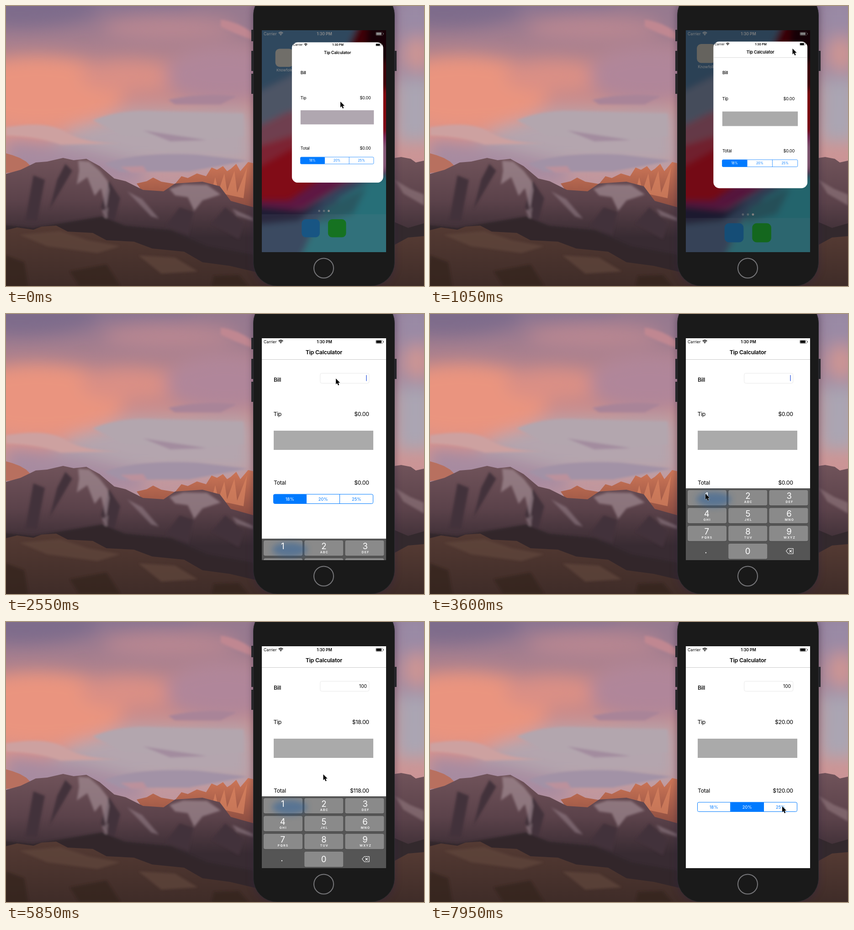
Write an HTML page that moves like this. It is 915 px wide and 612 px high and loops after 8000 ms.

```html
<!DOCTYPE html>
<html lang="en">
<head>
<meta charset="utf-8">
<title>Tip Calculator</title>
<style>
html, body { margin: 0; width: 100%; height: 100%; overflow: hidden; background: #1a1a1a; }
svg { display: block; width: 915px; height: 612px; }
text { font-family: Inter, "Open Sans", sans-serif; }
.label { font-size: 12.3px; letter-spacing: -.3px; }
.mid { text-anchor: middle; }
.end { text-anchor: end; }
.small { font-size: 8.7px; }
.name { font-size: 8.7px; fill: #fff; text-anchor: middle; }
.digit { font-size: 18.5px; fill: #fff; text-anchor: middle; }
.letters { font-size: 6.7px; font-weight: 600; letter-spacing: 1.4px; fill: #fff; text-anchor: middle; }
.rate { font-size: 9.4px; text-anchor: middle; }
</style>
</head>
<body>
<svg viewBox="0 0 915 612">
  <defs>
    <linearGradient id="sky" x2="0" y2="1">
      <stop offset="0" stop-color="#8c7591"/>
      <stop offset=".2" stop-color="#b5848c"/>
      <stop offset=".45" stop-color="#d8928c"/>
      <stop offset=".72" stop-color="#b498a6"/>
      <stop offset="1" stop-color="#9a869d"/>
    </linearGradient>
    <linearGradient id="slope" x2="0" y2="1">
      <stop offset="0" stop-color="#70535a"/>
      <stop offset=".35" stop-color="#5b424a"/>
      <stop offset=".65" stop-color="#382b32"/>
    </linearGradient>
    <linearGradient id="crag" x2="0" y2="1">
      <stop offset="0" stop-color="#cf7757"/>
      <stop offset="1" stop-color="#85493f"/>
    </linearGradient>
    <linearGradient id="rocks" x2="0" y2="1">
      <stop offset="0" stop-color="#543a33"/>
      <stop offset="1" stop-color="#3f2c28"/>
    </linearGradient>
    <filter id="soft" x="-50%" y="-50%" width="200%" height="200%"><feGaussianBlur stdDeviation="18"/></filter>
    <filter id="mist" x="-50%" y="-50%" width="200%" height="200%"><feGaussianBlur stdDeviation="7"/></filter>
    <filter id="haze" x="-50%" y="-50%" width="200%" height="200%"><feGaussianBlur stdDeviation="2.5"/></filter>
    <clipPath id="screen"><rect x="560" y="53" width="272" height="485"/></clipPath>
    <clipPath id="frame"><rect id="frameBox"/></clipPath>
  </defs>

  <!-- scenery -->
  <rect width="915" height="612" fill="url(#sky)"/>
  <g filter="url(#soft)">
    <ellipse cx="30" cy="0" rx="170" ry="45" fill="#7e6c8b"/>
    <ellipse cx="520" cy="10" rx="120" ry="40" fill="#96798f"/>
    <ellipse cx="360" cy="50" rx="150" ry="28" fill="#b88691"/>
    <ellipse cx="70" cy="190" rx="190" ry="80" fill="#ea947f"/>
    <ellipse cx="270" cy="155" rx="110" ry="35" fill="#da8f85"/>
    <ellipse cx="480" cy="150" rx="130" ry="60" fill="#b0869a"/>
    <path d="M150 265L270 228L541 225V350H330L90 305Z" fill="#b4a5ae"/>
    <path d="M0 290L160 310L300 345V390H0Z" fill="#a78ba0"/>
    <path d="M851 -20H940V160H851Z" fill="#9a8aa5"/>
    <ellipse cx="900" cy="105" rx="30" ry="40" fill="#cf9592"/>
    <path d="M851 160H940V300H851Z" fill="#aaa5b2"/>
  </g>
  <g filter="url(#haze)">
    <path d="M0 265Q90 250 130 275T250 300L120 303Q70 285 0 283Z" fill="#cda1a0"/>
    <path d="M190 250Q250 225 330 230L520 235V285L440 292L260 285Z" fill="#b3a6ae"/>
    <path d="M355 205Q430 188 505 197L470 215H370Z" fill="#a98498"/>
    <path d="M300 272L440 293L360 296Z" fill="#a38c9f"/>
    <path d="M470 30Q510 35 541 60V75Q500 60 470 45Z" fill="#c08791"/>
    <path d="M215 345Q290 318 420 325L530 338L400 362H250Z" fill="#a292a6"/>
    <path d="M250 352L300 350L310 364H275Z" fill="#bb919c"/>
  </g>
  <path d="M0 322L14 326L30 332L44 340L54 350L30 362L0 365Z" fill="#b8705f"/>
  <path d="M286 388L308 383L322 375L340 384L370 389L384 372L398 376L418 366L438 372L450 353L462 358L475 350L484 361L492 356L504 345L513 361L530 341L560 348V450H330Z" fill="url(#crag)"/>
  <path d="M450 405L458 374L465 405L478 366L484 405L500 360L506 408L528 352L520 420Z" fill="#d98460" opacity=".7"/>
  <path d="M0 367L32 358L65 342L90 340L125 332L148 337L176 334L205 350L237 377L262 383L300 402L345 405L370 388L430 384L468 394L492 426L560 445V600H0Z" fill="url(#slope)"/>
  <g filter="url(#haze)">
    <path d="M60 370L85 380L68 470H42ZM130 345L145 360L95 445L112 380ZM225 382L250 420L235 480L208 440ZM380 440L410 450L400 500L350 480ZM480 440L520 475L510 510L450 475Z" fill="#43333b"/>
    <path d="M158 338L182 340L205 360L222 382L226 402L219 445L208 398L194 415L178 374L155 390L160 360ZM358 400L388 390L440 391L470 412L430 425L412 448L398 418L370 414Z" fill="#aa959d" opacity=".6"/>
    <path d="M265 405L298 422L335 465L318 460ZM495 443L541 463V470L505 458ZM210 448L224 440L220 470Z" fill="#a59099" opacity=".45"/>
    <path d="M-10 478L60 485L120 475L210 460L260 480L360 490L440 525L580 550V612H-10Z" fill="#30262a"/>
  </g>
  <path d="M0 490L24 484L60 489L78 482L110 480L135 493L190 496L220 512L280 515L320 530L390 537L430 560L490 568L541 580L600 590V612H0Z" fill="url(#rocks)"/>
  <g filter="url(#haze)">
    <path d="M0 545L40 560L50 620H-10ZM140 580L220 565L250 612H160ZM455 590L510 588L530 612H450Z" fill="#33241f" opacity=".7"/>
    <path d="M30 500L120 492L180 512L250 525L200 540L90 525ZM290 545L370 550L420 580L340 585Z" fill="#62463c" opacity=".7"/>
  </g>
  <path d="M800 333H845L865 330L886 334L897 342L915 338V612H800Z" fill="url(#slope)"/>
  <path d="M851 380L885 400L915 412V436L870 410Z" fill="#8b7278" opacity=".7" filter="url(#haze)"/>
  <path d="M800 470H845L880 485L915 475V612H800Z" fill="#33292d"/>
  <path d="M800 540L845 525L880 506L915 503V612H800Z" fill="url(#rocks)"/>

  <!-- phone -->
  <rect x="538" y="-32" width="316" height="648" rx="52" fill="#30203c" opacity=".35" filter="url(#mist)"/>
  <path d="M537 52h6v25h-6zM537 98h6v44h-6zM537 148h6v44h-6zM849 98h6v44h-6z" fill="#26252a"/>
  <rect x="541.5" y="-32" width="309" height="644" rx="52" fill="#1a1a1a" stroke="#2c2b30"/>
  <circle cx="695.5" cy="573" r="21.5" fill="#191919" stroke="#77777a" stroke-width="2"/>

  <g clip-path="url(#screen)">
    <g id="home">
      <rect x="560" y="53" width="272" height="485" fill="#ea152a"/>
      <g filter="url(#mist)">
        <path d="M540 30H800L725 130L735 235L680 250L540 320Z" fill="#5683ab"/>
        <path d="M540 195L640 145L700 155L725 200L705 235L540 290Z" fill="#8c9ab8"/>
        <path d="M540 270L610 235L725 200L735 235L670 275L540 330Z" fill="#c9738f"/>
        <path d="M540 310L620 285L690 265L650 300L540 360Z" fill="#e2405b"/>
        <path d="M680 120L725 130L758 165L735 235L725 205Z" fill="#76486a"/>
        <path d="M775 30H850V175L745 215L728 135Z" fill="#750611"/>
        <path d="M790 30H850V120L785 130Z" fill="#2c0409"/>
        <path d="M850 175L740 225L715 270L850 245Z" fill="#f0101d"/>
        <path d="M540 425L620 425L700 370L760 310L805 275L850 280V400L690 450L540 470Z" fill="#ab2a79"/>
        <path d="M720 355L765 300L805 275L850 285V350L770 362Z" fill="#e457ad"/>
        <ellipse cx="825" cy="330" rx="20" ry="32" fill="#f5a6da"/>
        <path d="M540 445L650 445L730 395L790 368L850 360V560H540Z" fill="#5b78a5"/>
        <path d="M540 435L650 448L700 425L640 470L540 480Z" fill="#38305f"/>
        <path d="M680 475L730 420L790 385L850 368V560H640Z" fill="#46c9da"/>
        <path d="M700 440L790 395L760 455L690 475Z" fill="#4b9fb1"/>
      </g>
      <path d="M680 270L678 245L700 240L712 248L719 260L700 258Z" fill="#b92d55" opacity=".6" filter="url(#haze)"/>
      <g id="icons">
        <rect x="400" y="471" width="600" height="250" fill="#d8ecff" opacity=".12"/>
        <g fill="#fff">
          <circle cx="684.5" cy="463" r="2.6" opacity=".5"/>
          <circle cx="696" cy="463" r="2.6" opacity=".5"/>
          <circle cx="707.5" cy="463" r="2.6"/>
        </g>
        <g id="tiles"></g>
        <g id="launcher">
          <rect x="769" y="73.500" width="43.500" height="43.500" rx="10" fill="#fafafa"/>
          <path id="grid" fill="none" stroke="#c9c9c9" stroke-width=".6"/>
          <rect id="press" x="769" y="73.500" width="43.500" height="43.500" rx="10" opacity=".4"/>
        </g>
      </g>
      <g id="homeBar"></g>
      <rect id="dim" x="560" y="53" width="272" height="485"/>
    </g>

    <g id="window" clip-path="url(#frame)">
      <g id="app">
        <rect x="560" y="53" width="272" height="485" fill="#fff"/>
        <g id="appBar"></g>
        <text class="mid" x="695.8" y="88" font-size="12.3" font-weight="600" letter-spacing="-.2">Tip Calculator</text>
        <path id="rule" d="M560 99.500H832" stroke="#cacaca"/>
        <text class="label" x="586" y="147.800" font-weight="500">Bill</text>
        <g id="field">
          <rect x="687.800" y="129.500" width="107" height="21.800" rx="3.500" fill="#fff" stroke="#e9e9e9"/>
          <text id="bill" class="end" x="790" y="143.800" font-size="10.2"></text>
          <path id="caret" d="M789 133.500V146.500" stroke="#4a6ee0" stroke-width="1.5"/>
        </g>
        <text class="label" x="585.500" y="223">Tip</text>
        <text id="tip" class="label end" x="794.800" y="223"></text>
        <rect id="bar" x="586" y="255" width="218" height="42"/>
        <text class="label" x="586" y="372.700">Total</text>
        <text id="total" class="label end" x="794.800" y="372.700"></text>
        <g id="rates"></g>
        <rect x="585.500" y="394" width="218" height="20.500" rx="3" fill="none" stroke="#007aff"/>
        <path d="M657.500 394V414.500M730.500 394V414.500" stroke="#007aff"/>
      </g>
      <rect id="cover" fill="#fafafa"/>
    </g>
    <g id="keyboard"></g>
  </g>
  <path id="pointer" d="M0 0V12.800L2.900 10.100L5 15L7.200 14L5.200 9.200H9.200Z" stroke="#fff" stroke-width=".8" paint-order="stroke"/>
</svg>
<script>
const TICK = 150, LOOP = 8000;
const $ = id => document.getElementById(id);
const set = (id, attrs) => { for (const k in attrs) $(id).setAttribute(k, attrs[k]); };
const show = (id, on) => set(id, { visibility: on ? 'visible' : 'hidden' });

// Linear interpolation through rows of [time, ...values].
function track(rows, t) {
  let i = 0;
  while (i < rows.length - 1 && rows[i + 1][0] <= t) i++;
  const a = rows[i], b = rows[i + 1] || a;
  const k = b === a ? 0 : Math.max(0, (t - a[0]) / (b[0] - a[0]));
  return a.slice(1).map((v, j) => v + (b[j + 1] - v) * k);
}

function statusBar(color) {
  return `<g fill="${color}"><text class="small" x="564" y="64">Carrier</text>
    <text class="small mid" x="697" y="64" font-weight="600">1:30 PM</text>
    <path d="M599.600 62.300Q601.500 60.600 603.400 62.300L601.500 64.300Z"/>
    <g fill="none" stroke="${color}" stroke-width="1.4">
      <path d="M598.300 61Q601.500 58 604.700 61M596.600 59.200Q601.500 55 606.400 59.200"/></g>
    <rect x="809.500" y="57" width="15.500" height="7.500" rx="1.800" fill="none" stroke="${color}" stroke-width=".6" opacity=".7"/>
    <rect x="810.500" y="58" width="11.500" height="5.500" rx=".8"/>
    <path d="M826.200 59.500v2.500" stroke="${color}" stroke-width="1"/></g>`;
}

function buildHome() {
  const tile = (x, y, fill) =>
    `<rect x="${x - 21.75}" y="${y - 21.75}" width="43.5" height="43.5" rx="10" fill="${fill}"/>`;
  const names = ['Knowfolk', 'Sheaf', 'Dials', 'plimp'];
  const fills = ['#cbc7be', '#fbfcfd', '#1b1b1d'];
  $('tiles').innerHTML =
    names.map((n, i) => `<text class="name" x="${600.7 + i * 63.3}" y="128.5">${n}</text>`).join('') +
    fills.map((f, i) => tile(600.9 + i * 63.2, 95.2, f)).join('') +
    tile(664.2, 504.7, '#2b9bed') + tile(727.5, 504.7, '#28cf3c');
  let d = 'M769 73.5l43.5 43.5M812.5 73.5l-43.5 43.5';
  for (let i = 1; i < 6; i++) {
    const s = i * 7.25;
    d += `M${769 + s} 73.5v43.5M769 ${73.5 + s}h43.5`;
  }
  for (const r of [8, 12, 18]) d += `M${790.75 - r} 95.25a${r} ${r} 0 1 0 ${2 * r} 0a${r} ${r} 0 1 0 ${-2 * r} 0`;
  set('grid', { d });
}

function buildKeyboard() {
  const letters = ['', 'ABC', 'DEF', 'GHI', 'JKL', 'MNO', 'PQRS', 'TUV', 'WXYZ'];
  const keyBox = (n, x, y) =>
    `<rect x="${x}" y="${y + 1}" width="85" height="33.500" rx="3.5" fill="#414141"/>
     <rect id="key${n}" x="${x}" y="${y}" width="85" height="33.500" rx="3.5"/>`;
  let boxes = '', text = '';
  letters.forEach((s, i) => {
    const x = 564 + (i % 3) * 89.2, y = 385 + Math.floor(i / 3) * 39;
    const cx = 605.7 + (i % 3) * 90.2;
    boxes += keyBox(i + 1, x, y);
    text += `<text class="digit" x="${cx}" y="${y + 18.5}">${i + 1}</text>
      <text class="letters" x="${cx + 1}" y="${y + 28}">${s}</text>`;
  });
  $('keyboard').innerHTML = `<rect x="560" y="381" width="272" height="157" fill="#555"/>
    ${boxes}${keyBox(0, 653.2, 502)}
    <ellipse cx="621" cy="405" rx="38" ry="16" fill="#285f9c" opacity=".5" filter="url(#mist)"/>
    ${text}<text class="digit" x="695.700" y="525">0</text>
    <text class="digit" x="604" y="523" font-size="16">.</text>
    <path d="M779.500 518l5-5.500h10.500v11.500h-10.500zM786.500 515.500l5.500 5.500m0-5.500l-5.500 5.500"
      fill="none" stroke="#fff" stroke-width="1.1" stroke-linejoin="round"/>`;
}

function buildRates() {
  $('rates').innerHTML = [18, 20, 25].map((r, i) =>
    `<rect id="seg${r}" x="${585.5 + i * 72.7}" y="394" width="72.600" height="20.500" rx="${i == 1 ? 0 : 3}"/>
     <text id="rate${r}" class="rate" x="${621.2 + i * 73}" y="407.800">${r}%</text>`).join('');
}

const openness = [[0, .686], [150, .28], [300, .06], [450, 0], [750, 0], [900, .34],
  [1050, .712], [1200, .91], [1350, .98], [1500, 1]];
// [time, home scale, dimming]
const depth = [[0, .91, .45], [150, .96, .22], [300, .99, .06], [450, 1, 0], [750, 1, 0],
  [900, .987, .25], [1050, .957, .5], [1350, .9, .6]];
const keyboardDrop = [[2400, 157], [2550, 110], [2700, 35], [2850, 6], [3000, 0],
  [6300, 0], [6450, 70], [6600, 140], [6750, 157]];
const pointerPath = [[0, 732, 209], [150, 758, 163], [300, 782, 112], [450, 790, 95], [900, 790, 94],
  [1050, 793.5, 93], [1200, 786, 98], [1350, 760, 116], [1500, 735, 133], [1650, 724, 139], [1800, 722, 140],
  [2550, 722, 141], [2850, 690, 215], [3150, 625, 350], [3300, 607, 384], [3450, 604, 392], [3600, 603, 393],
  [4050, 603, 393], [4200, 628, 422], [4350, 668, 452], [4500, 688, 494], [4650, 693, 512], [5100, 693, 512],
  [5250, 696, 460], [5400, 697, 394], [5550, 696, 360], [5700, 695, 341], [5850, 694.5, 333],
  [6300, 694.5, 333], [6600, 692, 362], [6900, 690, 396], [7050, 690, 400], [7350, 690, 401],
  [7500, 708, 402], [7650, 742, 403], [7800, 766, 403], [7950, 771, 403]];

const within = (t, a, b) => t >= a && t < b;
const money = v => '$' + v.toFixed(2);

function drawWindow(t) {
  const [p] = track(openness, t);
  const [scale, dim] = track(depth, t);
  const closing = t < 450;
  show('home', p < 1);
  show('launcher', p === 0);
  show('press', p === 0 && within(t, 750, 900));
  set('icons', { transform: `translate(696 295) scale(${scale}) translate(-696 -295)` });
  set('dim', { opacity: dim });

  const width = 43.5 + 228.5 * p, height = 43.5 + 441.5 * p ** 1.37;
  const x = 769 - 209 * p, y = 95.2 + 200.3 * p - height / 2;
  const rx = p < .75 ? 10 + 5 * p : 55 * (1 - p);
  set('window', { opacity: p > 0 ? 1 : 0 });
  set('frameBox', { x, y, width, height, rx });
  set('cover', { x, y, width, height, opacity: Math.max(0, 1 - p * 3) });
  set('app', { transform: `translate(${x} ${y}) scale(${width / 272}) translate(-560 -53)` });
  set('bar', { fill: closing ? '#b0a7b0' : '#aaa' });
  set('rule', { opacity: closing ? 0 : 1 });
  set('field', { opacity: p > .95 ? 1 : 0 });
}

function drawForm(t) {
  const bill = t < 3900 ? '' : t < 4800 ? '1' : t < 5100 ? '10' : '100';
  const rate = t < 7350 ? 18 : 20;
  const tip = bill * rate / 100;
  $('bill').textContent = bill;
  $('tip').textContent = money(tip);
  $('total').textContent = money(+bill + tip);
  for (const r of [18, 20, 25]) {
    set('seg' + r, { fill: r === rate ? '#007aff' : '#fff' });
    set('rate' + r, { fill: r === rate ? '#fff' : '#007aff' });
  }
  const blink = (t - 2400) % 1050 < 600;
  set('caret', { opacity: within(t, 2400, 5700) && (blink || within(t, 3900, 5400)) ? 1 : 0 });

  const [drop] = track(keyboardDrop, t);
  set('keyboard', { transform: `translate(0 ${drop})`, opacity: drop < 157 ? 1 : 0 });
  for (let n = 0; n < 10; n++) {
    const down = n === 1 ? within(t, 3900, 4050)
      : n === 0 && (within(t, 4800, 4950) || within(t, 5100, 5250));
    set('key' + n, { fill: down ? '#616161' : '#8a8a8a' });
  }
}

function draw(ms) {
  const t = Math.floor((ms % LOOP) / TICK) * TICK;
  drawWindow(t);
  drawForm(t);
  set('pointer', { transform: `translate(${track(pointerPath, t).join(' ')})` });
}

$('homeBar').innerHTML = statusBar('#fff');
$('appBar').innerHTML = statusBar('#000');
buildHome();
buildKeyboard();
buildRates();

const start = performance.now();
function loop() {
  draw(performance.now() - start);
  requestAnimationFrame(loop);
}
loop();
</script>
</body>
</html>
```
